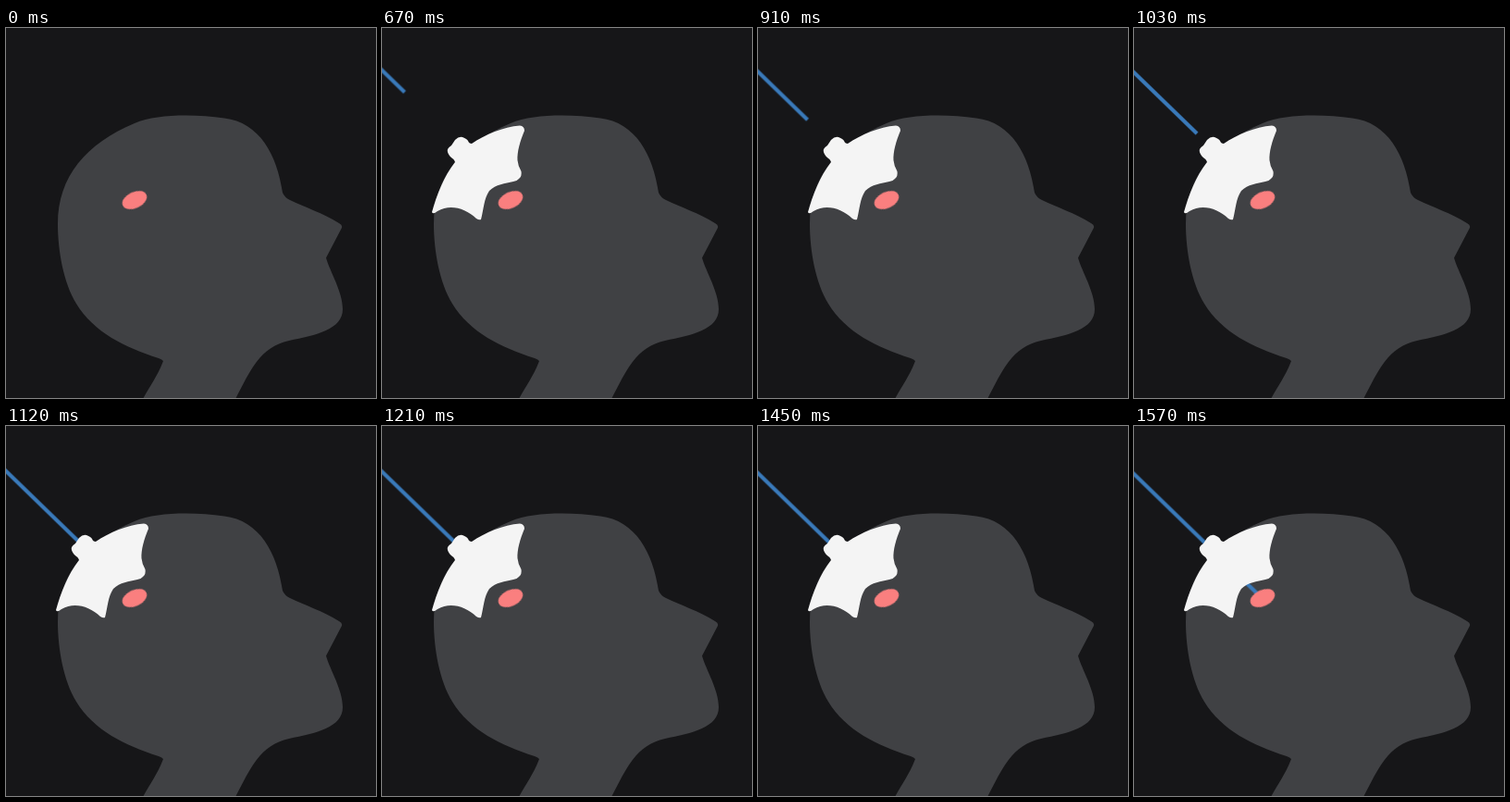
These frames come from a looping animation (400x400 px, 2.24 s). An HTML page:

```html
<!DOCTYPE html>
<html lang="en">
<head>
<meta charset="utf-8">
<title>Probe insertion</title>
<style>
  html, body { margin: 0; width: 100%; height: 100%; overflow: hidden; background: #161618; }
  svg { display: block; width: 100vw; height: 100vh; }
</style>
</head>
<body>
<svg viewBox="0 0 400 400">
  <path fill="#404144" d="M148 401 C156 386 163 378 170 360 Q169 358.500 165 357
    C128 345 95 329 76 298 C62 275 56 240 56 212 C56 160 87 125 139 103
    C163 93 203 93 236 97.500 C274 102 293 137 299 178 Q301 183 307 186
    C324 194 342 200 360 211 Q364 213 363 216 L346 248.500
    C350 263 364 285 364 304 C364 326 335 332 306 338 C274 345 264 371 248 401 Z"/>
  <g id="gear">
    <path id="probe" d="M0 0 L-160 -155.200" stroke="#3a7aba" stroke-width="4.100"/>
    <path fill="#f4f4f4" d="M54 199 C59 181 67 160 79 145 C78 141 75 141 73 138
      Q70 134 71 131 Q72 129 75 127 L79 121 Q83 117 87 118 Q92 120 93 122 Q94 125 97 125
      C112 115 131 107 149 105.500 Q154 106 154 111 C149 123 146 134 146.500 143
      Q147 149 150.500 155 Q151.500 160 148 163 Q146 165.500 142 166 C133 168 123 169 116 176
      C110 185 110 196 107 207 Q105 208 102 206 C90 195 74 190 60 198 Q55 202 54 199 Z"/>
  </g>
  <ellipse cx="139" cy="186" rx="14" ry="8.800" fill="#fa7f7f" transform="rotate(-25 139 186)"/>
</svg>
<script>
  const LOOP = 2240, ENTER = 670, STOP = 1570, STEP = 30;
  const at = ms => ms / LOOP;
  const move = (x, y) => `translate(${x}px, ${y}px)`;
  const start = move(24.5, 69.4), end = move(133.3, 181.2);

  function loop(id, frames) {
    document.getElementById(id)
      .animate(frames, { duration: LOOP, iterations: Infinity })
      .startTime = document.timeline.currentTime;
  }

  loop("gear", [
    { offset: 0, opacity: 0, easing: "step-end" },
    { offset: at(ENTER), opacity: 1 },
    { offset: 1, opacity: 1 }
  ]);

  loop("probe", [
    { offset: 0, transform: start },
    { offset: at(ENTER), transform: start, easing: `steps(${(STOP - ENTER) / STEP})` },
    { offset: at(STOP), transform: end },
    { offset: 1, transform: end }
  ]);
</script>
</body>
</html>
```
